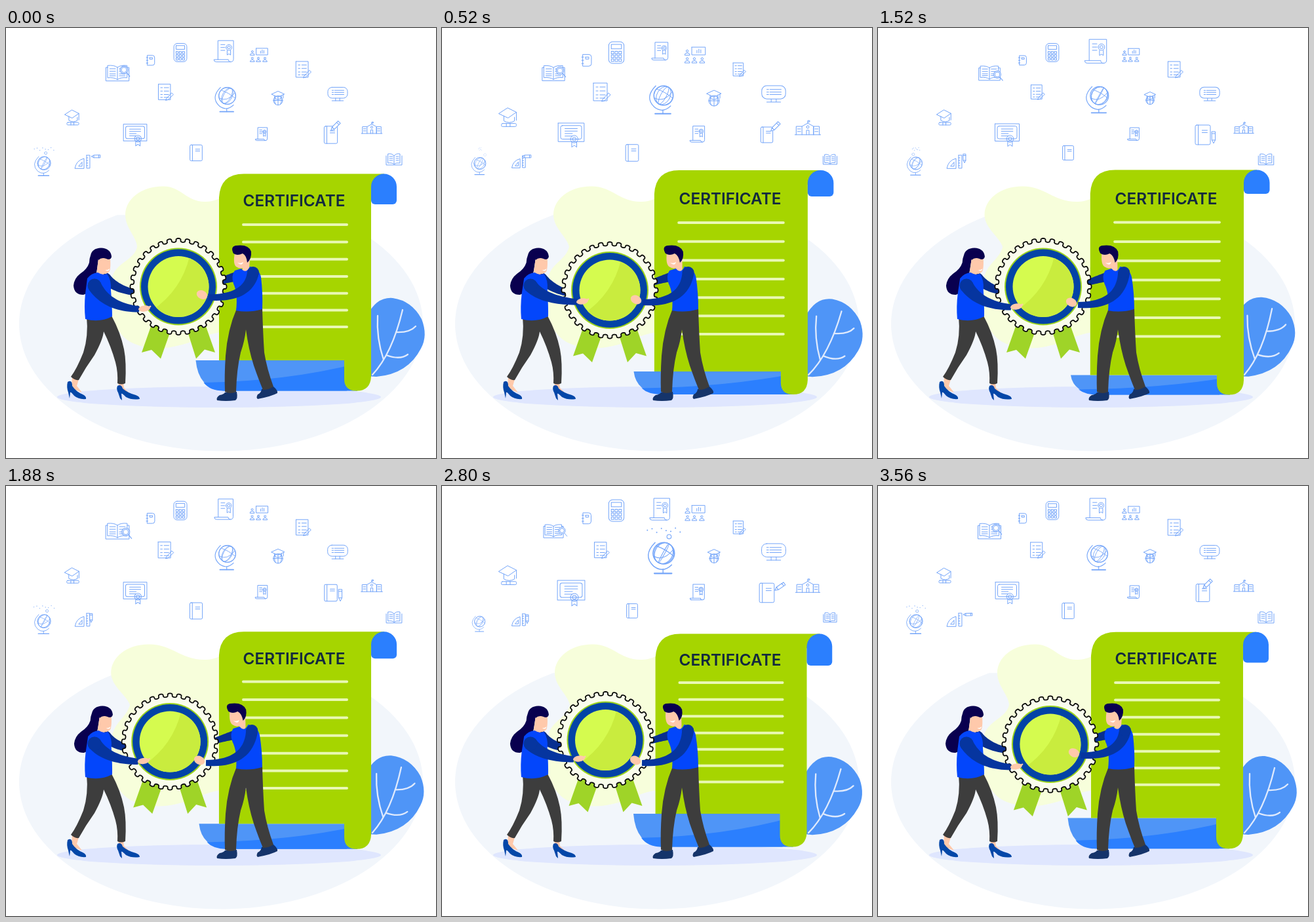
Write an HTML page with a canvas that moves like this. It is 656 px wide and 656 px high and loops after 3600 ms.

```html
<!DOCTYPE html>
<html lang="en">
<head>
<meta charset="utf-8">
<title>Certificate</title>
<style>
html, body { margin: 0; width: 100%; height: 100%; overflow: hidden; background: #fff; }
canvas { display: block; width: 656px; height: 656px; }
</style>
</head>
<body>
<canvas id="stage" width="656" height="656"></canvas>
<script>
const ctx = document.getElementById('stage').getContext('2d');
const LOOP = 3600, STEP = 40, PULSE = 1800, TAU = Math.PI * 2;
const TIMES = [0, 520, 1040, 1520, 2240, 2800];
const SKIN = '#ffc9ab', HAIR = '#09004f', SHIRT = '#0346fb', SLEEVE = '#06359f';
const TROUSERS = '#3d3d3d', GREEN = '#a6d500', BLUE = '#2b7ffe', LIGHT_BLUE = '#4f95f7';
const INK = '#74a5f9';

// Periodic monotone cubic through the given poses.
function track(t, values, times = TIMES) {
  const n = values.length;
  const time = i => times[(i + n) % n] + Math.floor(i / n) * LOOP;
  const value = i => values[(i + n) % n];
  const slope = i => (value(i + 1) - value(i)) / (time(i + 1) - time(i));
  const tangent = i => {
    const a = slope(i - 1), b = slope(i);
    return a * b <= 0 ? 0 : 2 * a * b / (a + b);
  };
  let i = n - 1;
  while (times[i] > t) i--;
  const span = time(i + 1) - time(i), u = (t - time(i)) / span, v = 1 - u;
  return value(i) * v * v * (1 + 2 * u) + value(i + 1) * u * u * (3 - 2 * u)
    + span * u * v * (v * tangent(i) - u * tangent(i + 1));
}

const wave = (t, peak) => Math.cos(TAU * (t - peak) / PULSE);
const pulse = (t, min, max, peak) => (min + max + (max - min) * wave(t, peak)) / 2;

function fill(path, color) {
  ctx.fillStyle = color;
  ctx.fill(path instanceof Path2D ? path : new Path2D(path));
}

function stroke(path, color, width) {
  ctx.strokeStyle = color;
  ctx.lineWidth = width;
  ctx.stroke(path instanceof Path2D ? path : new Path2D(path));
}

function oval(x, y, rx, ry, color, angle = 0) {
  ctx.fillStyle = color;
  ctx.beginPath();
  ctx.ellipse(x, y, rx, ry, angle, 0, TAU);
  ctx.fill();
}

function at(x, y, draw, scale = 1, angle = 0) {
  ctx.save();
  ctx.translate(x, y);
  ctx.rotate(angle);
  ctx.scale(scale, scale);
  draw();
  ctx.restore();
}

// Tapered limb along a quadratic curve.
function limb(x0, y0, cx, cy, x1, y1, w0, w1, color) {
  const upper = [], lower = [], steps = 20;
  for (let i = 0; i <= steps; i++) {
    const u = i / steps, v = 1 - u;
    const x = v * v * x0 + 2 * u * v * cx + u * u * x1;
    const y = v * v * y0 + 2 * u * v * cy + u * u * y1;
    const a = Math.atan2(v * (cy - y0) + u * (y1 - cy), v * (cx - x0) + u * (x1 - cx));
    const w = (w0 + (w1 - w0) * u) / 2;
    upper.push([x - w * Math.sin(a), y + w * Math.cos(a)]);
    lower.unshift([x + w * Math.sin(a), y - w * Math.cos(a)]);
  }
  ctx.fillStyle = color;
  ctx.beginPath();
  for (const p of upper.concat(lower)) ctx.lineTo(...p);
  ctx.fill();
  oval(x0, y0, w0 / 2, w0 / 2, color);
}

// Path pieces for the line icons.
const ring = (x, y, r) => `M${x - r} ${y}a${r} ${r} 0 1 1 ${2 * r} 0a${r} ${r} 0 1 1 ${-2 * r} 0`;
const box = (x, y, w, h, r = 0) => `M${x + r} ${y}h${w - 2 * r}a${r} ${r} 0 0 1 ${r} ${r}v${h - 2 * r}`
  + `a${r} ${r} 0 0 1 ${-r} ${r}h${2 * r - w}a${r} ${r} 0 0 1 ${-r} ${-r}v${2 * r - h}a${r} ${r} 0 0 1 ${r} ${-r}z`;
const rows = (x, w, ...ys) => ys.map(y => `M${x} ${y}h${w}`).join('');
const person = (x, y) => ring(x, y - 3, 1.7) + `M${x - 4} ${y + 3}q0-3 4-3q4 0 4 3z`;
const keypad = [-2, 4, 10].map(y => [-8, -2, 4].map(x => box(x, y, 4, 4)).join('')).join('');

const CALCULATOR = box(-12, -17, 24, 34, 6) + box(-8, -13, 16, 7) + keypad;
const NOTEBOOK = 'M-5-9H4q4 0 4 4V5q0 4-4 4H-5z' + box(-1, -5, 5, 3) + rows(-7, 3, -5, 0, 5);
const DEED = 'M-11 15V-18H16V14q0 5-5 5H-14q-4 0-4-4H7q0 4 4 4' + ring(8, -6, 5) + ring(8, -6, 2.5)
  + 'M5-1v8l3-2l3 2v-8' + rows(-6, 7, -11, -6, -1);
const CLASSROOM = person(-11, -3) + person(-11, 9) + person(0, 9) + person(12, 9)
  + box(-4, -12, 21, 12) + 'M4-3v-4M7-3v-6M10-3v-5';
const CHECKLIST = box(-12, -14, 21, 27) + rows(-2, 8, -8, -2, 4, 9) + rows(-8, 3, -8, -2, 4, 9)
  + 'M2 11l9-10l3 3l-9 9l-4 1z';
const SCHOLAR = 'M-11-7l11-5l11 5l-11 5zM-6-4v4q6 4 12 0v-4M9-6v6' + ring(0, 4, 8)
  + 'M-8 4h16M0-3v15M-4-3q-4 7 0 14M4-3q4 7 0 14';
const MONITOR = box(-19, -14, 38, 21, 8) + rows(-11, 3, -8, -4, 0) + rows(-6, 18, -8, -4, 0)
  + 'M-4 7v5M4 7v5M-11 12h22';
const MORTARBOARD = 'M-16-8l14-9l14 7l-13 9zM-8-4v8q9 5 17 0v-6M12-10v13'
  + box(-12, 8, 24, 5, 2) + 'M-4 8v5M2 8v5';
const DIPLOMA = box(-21, -18, 42, 30) + box(-17, -14, 34, 22, 3) + rows(-10, 20, -9, -5)
  + rows(-10, 12, -1, 3) + ring(5, 8, 6) + ring(5, 8, 3) + 'M1 13v8l4-3l4 3v-8';
const BOOK = box(-10, -13, 20, 26, 2) + 'M-6-13v26' + rows(-1, 7, -6, -3);
const SCHOOL = 'M-20 10h40M-18 10v-13h9v13M9 10v-13h9v13M-9-3l9-5l9 5v13M-2 10v-7h4v7M0-8v-4h3v2h-3'
  + rows(-16, 5, 1, 5) + rows(11, 5, 1, 5) + ring(0, -2, 2);
const OPEN_BOOK = 'M0-6v13M-12-6v14h24v-14M-9-9q6-1 9 3q3-4 9-3v14q-6-1-9 2q-3-3-9-2z'
  + rows(-7, 5, -5, -2, 1) + rows(3, 4, -5, -2, 1);
const MAGAZINE = 'M-15-12q10-1 15 3q5-4 15-3v19q-10-1-15 3q-5-4-15-3zM0-9v19M-15-9h-3v21h36v-21h-3'
  + rows(-12, 9, -7, -3, 1, 4) + rows(3, 9, -7, -3, 1, 4);
const DRAWING_SET = 'M-15 10q2-12 14-15v15zM-9 7h5v-6z' + box(3, -10, 5, 20) + rows(3, 2, -6, -2, 2, 6);
const PENCIL = 'M-2.5-9h5V4l-2.5 5l-2.5-5zM-2.5-6h5M-2.5 4h5';

// x, y, smallest scale, largest scale, time of largest, path
const ICONS = [
  [266, 37.5, .81, 1, 760, CALCULATOR],
  [170, 69, .83, 1, 200, MAGAZINE],
  [220, 49.3, .8, 1, 640, NOTEBOOK],
  [333, 35, .73, 1, 1380, DEED],
  [390, 161.5, .52, .68, 720, DEED],
  [385, 41, .81, 1, 680, CLASSROOM],
  [243, 98, .79, 1, 500, CHECKLIST],
  [453, 63.5, .7, .9, 1680, CHECKLIST],
  [415, 107, .78, 1, 480, SCHOLAR],
  [506, 101.5, .78, 1, 780, MONITOR],
  [102, 138, .75, 1, 780, MORTARBOARD],
  [197, 162, .85, 1, 900, DIPLOMA],
  [495.5, 163, .9, 1.2, 1280, BOOK],
  [290, 190.5, .8, 1, 350, BOOK],
  [558, 153, .76, 1, 680, SCHOOL],
  [592, 201, .83, 1, 1750, OPEN_BOOK],
  [120, 204, .88, 1, 1650, DRAWING_SET]
].map(([x, y, min, max, peak, path]) => ({ x, y, min, max, peak, path: new Path2D(path) }));

function pencil(x, y, degrees, scale) {
  at(x, y, () => { fill(PENCIL, '#fff'); stroke(PENCIL, INK, 1 / scale); }, scale, degrees * Math.PI / 180);
}

function globe(t, x, y, min, max, peak) {
  const phase = (t - peak + 1.5 * PULSE) % PULSE / PULSE;
  at(x, y, () => {
    stroke(ring(3, -4, 15) + 'M-9-19q-18 18-2 33q13 10 25-2M2 18v6', INK, 1.3);
    stroke('M-10 24h24', INK, 2);
    ctx.lineWidth = 1;
    for (let i = 0; i < 3; i++) {
      ctx.beginPath();
      ctx.ellipse(3, -4, 15 * Math.abs(Math.cos(TAU * phase / 2 + i * 1.05)), 15, .5, 0, TAU);
      ctx.stroke();
    }
    stroke('M-11 0Q3 8 17-10M-7-14Q5-10 17 0', INK, 1);
  }, pulse(t, min, max, peak));
  const shown = Math.max(0, Math.cos(TAU * (phase - .52)) * .9 + .1);
  if (shown < .05) return;
  at(x, y, () => {
    ctx.globalAlpha = Math.min(1, shown * 2);
    for (let i = 0; i < 8; i++) {
      oval(3 + (i - 3.5) * 6.5 * shown, -36 - 3 * Math.sin(i * 2.4), .9, .9, INK);
    }
    stroke(ring(-13 + 27 * Math.min(1, Math.max(0, phase * 2.4 - .4)), -22 - 5 * shown, 3), INK, 1);
  }, max);
  ctx.globalAlpha = 1;
}

function drawIcons(t) {
  for (const { x, y, min, max, peak, path } of ICONS) {
    const scale = pulse(t, min, max, peak);
    at(x, y, () => stroke(path, INK, 1 / scale), scale);
  }
  at(track(t, [180, 180, 178, 182, 183, 183]), track(t, [64, 65, 68, 71, 69, 68]), () => {
    fill(ring(0, 0, 6), '#fff');
    stroke(ring(0, 0, 6) + ring(0, 0, 4) + 'M4 4l5 6', INK, 1.1);
  }, pulse(t, .85, 1, 200));
  globe(t, 335, 107, .86, 1.1, 950);
  globe(t, 56, 209, .54, .68, 50);
  pencil(track(t, [502, 508, 515, 512, 509, 515]), track(t, [150, 151, 154, 167, 166, 154]),
    track(t, [45, 45, 60, 0, 0, 55]), 1);
  pencil(track(t, [137, 129, 138, 132, 129, 130]), track(t, [196, 196, 197.5, 199, 203, 203]),
    track(t, [90, 90, 90, 0, 0, 0]), .75);
}

function drawBackdrop(t) {
  // The oval is flattened at the top.
  const cut = 1.03;
  ctx.fillStyle = '#f2f6fb';
  ctx.beginPath();
  ctx.ellipse(328, 451.5, 308, 194, 0, -cut, Math.PI + cut);
  ctx.fill();
  const d = track(t, [0, -12, -15.5, -19.5, -23, -10]);
  fill(`M${182 + d} 285C${182 + d} 262 ${205 + d} 241.5 ${240 + d} 241.5C${268 + d * .6} 241.5 ${275 + d * .4} 266 305 265
    C316 265 325 260 340 255L400 300V440C360 470 330 455 290 476C250 492 215 492 190 479
    C160 462 150 415 162 380C168 358 ${196 + d * .6} 354 ${200 + d * .5} 334C${200 + d * .7} 320 ${182 + d} 305 ${182 + d} 285Z`, '#f7fedb');
  oval(325, 563, 247, 16, '#dfe6fe');
}

function drawLeaf(t) {
  const sway = track(t, [0, 2.6, 3.4, 1, -2.2, .5, 2], [0, 520, 700, 1040, 1520, 2240, 2800]);
  at(557, 531, () => {
    fill('M-6 0Q-16-50-6-92Q8-121 33-119Q62-115 77-87Q87-62 76-42Q56-3 8 1Z', LIGHT_BLUE);
    stroke('M2-2Q32-34 48-101M19-25Q8-58 10-92M38-67Q59-66 68-76M23-32Q44-24 56-33', '#dfeafd', 2.3);
  }, 1, sway * Math.PI / 180);
}

function drawScroll(t) {
  const top = track(t, [222.5, 217, 214, 216.5, 226.5, 225.5]);
  const drop = top - 222.5, bottom = 776 - top;
  const left = 325 + drop * .2, right = 557 - drop * .16, end = 596 - drop * .25, fold = right - 41;
  const rollEnd = track(t, [269, 257, 250, 253, 272.5, 274]);
  const curl = track(t, [507, 524, 533, 529.5, 502, 500]), depth = bottom - curl;
  const curlLeft = track(t, [289.5, 292.5, 294, 294, 295, 292]);

  fill(`M${curlLeft} ${curl}H${fold + 4}V${bottom}H${curlLeft + 42}Q${curlLeft + 4} ${bottom - 3} ${curlLeft} ${curl}Z`, LIGHT_BLUE);
  fill(`M${curlLeft + 12} ${curl + depth * .73}Q${curlLeft + 140} ${curl + depth * .68} ${fold + 20} ${curl + depth * .1}V${bottom}
    H${curlLeft + 42}Q${curlLeft + 22} ${bottom} ${curlLeft + 12} ${curl + depth * .73}Z`, BLUE);
  fill(`M${left} ${curl}V${top + 36}Q${left + 2} ${top} ${left + 38} ${top}H${right + 20}V${top + 22}H${right}
    V${bottom - 22}Q${right - 1} ${bottom} ${right - 22} ${bottom}Q${fold} ${bottom} ${fold} ${bottom - 18}V${curl}Z`, GREEN);
  ctx.fillStyle = BLUE;
  ctx.beginPath();
  ctx.roundRect(right, top, end - right, rollEnd - top, [19.5, 19.5, 6, 6]);
  ctx.fill();

  ctx.fillStyle = '#12293f';
  ctx.font = '600 24.3px Inter, sans-serif';
  ctx.textAlign = 'center';
  ctx.fillText('CERTIFICATE', 439.5, 272.3 + drop * .55);

  const first = track(t, [300, 297, 295.5, 296.5, 300, 300]);
  const last = track(t, [456, 467, 473, 470.5, 452.5, 451.5]);
  const half = 79 - drop * .15;
  for (let i = 0; i < 7; i++) {
    const y = first + (last - first) * i / 6 + Math.sin(Math.PI * i / 6);
    stroke(`M${441 - half} ${y}H${441 + half}`, '#e9f8b4', 4);
  }
}

const TEETH = 32;
const scallops = new Path2D();
for (let i = 0; i <= 720; i++) {
  const a = i / 720 * TAU, r = 70.8 + 2.8 * Math.cos(TEETH * a), b = a + .016 * Math.sin(2 * TEETH * a);
  scallops.lineTo(r * Math.sin(b), -r * Math.cos(b));
}

function drawBadge(x, y) {
  at(x, y, () => {
    fill('M-41 58L-56 100.5L-41 96.5L-27 110L-10 62ZM41 58L56 100.5L40 96L27 110L12 62Z', '#9fd428');
    fill(scallops, '#fafdec');
    stroke(scallops, '#0a0a0a', 1.8);
    oval(0, 0, 59, 59, '#9bd31d');
    oval(0, 0, 57, 57, '#0343a6');
    oval(0, 0, 46.5, 46.5, '#d5fb4f');
    ctx.save();
    ctx.clip(new Path2D(ring(0, 0, 46.5)));
    fill('M18-50Q6 5-40 36L0 60L60 50V-50Z', '#c9ec3e');
    ctx.restore();
  });
}

// Upper bodies lean by shearing above the hips.
function lean(amount, hip, draw) {
  ctx.save();
  ctx.transform(1, 0, -amount, 1, amount * hip, 0);
  draw();
  ctx.restore();
}

function drawWoman(t) {
  const handX = track(t, [211, 214, 214, 211, 209, 209]);
  const handY = track(t, [428, 417, 428, 425, 415.5, 416]);
  fill('M101 531L111 536L108 546L116 556L100 550ZM171 541L179 541L180 549L190 559L174 554Z', SKIN);
  fill('M94 540Q101 536 101 546Q107 555 117 559Q123 562 122 566Q111 567 104 561Q99 555 98 556L97 565L95 556Q92 548 94 540Z', '#0447a8');
  fill('M170 546Q176 543 178 550Q186 557 198 560Q204 562 204 566Q192 568 183 563Q177 557 176 558L177 568L174 565L171 556Q168 551 170 546Z', '#0447a8');
  fill('M123 440Q126 470 118 495Q108 520 99 532Q105 538 111 537Q122 517 135 499Q148 475 149 463Q160 485 167 510Q171 525 170 542Q176 545 182 542Q184 510 180 490Q175 465 161 439Z', TROUSERS);
  lean(track(t, [0, .02, .025, .02, .02, .02]), 440, () => {
    fill('M129 347Q131 336 145 335.5Q159 336 161 348Q160 355 153 352Q146 349 141 352Q139 370 137 378Q128 388 125 398Q124 406 118 407Q104 407 103 393Q104 382 113 375Q124 368 127 358Q127 352 129 347Z', HAIR);
    fill('M141 352Q150 347 159 352Q160 365 158 371Q154 376 149 375L150 380Q142 382 138 376Z', SKIN);
    fill('M138 346Q150 338 161 349Q159 355 153 352Q146 349 141 354Z', HAIR);
    fill('M151 369Q155 370 158 367Q157 373 151 369Z', '#fff');
    fill('M124 382Q130 374 140 373Q148 378 154 375Q161 384 160 400Q162 425 162 440Q143 450 121 444Q119 425 121 405Z', SHIRT);
  });
  limb(135, 393, 154, handY - 2, handX - 8, handY + 1, 21, 9, SLEEVE);
  oval(handX, handY, 9, 4.5, SKIN, -.15);
  limb(handX + 2, handY, handX + 7, handY - 1, handX + 10, handY - 4, 4, 2, SKIN);
}

function drawMan(t) {
  const bend = track(t, [0, -.07, -.088, -.088, -.088, -.088]);
  const handX = track(t, [299, 296, 295, 295, 295, 295]);
  const handY = track(t, [407, 414.5, 418.5, 418.5, 418.5, 418.5]);
  fill('M334 556L352 555Q354 566 350 568Q335 570 322 568Q320 564 326 560Q332 559 334 556Z', '#15346a');
  fill('M390 551L408 547Q415 553 414 557Q405 562 384 566Q381 564 384 559Q389 557 390 551Z', '#15346a');
  fill('M352 428Q338 460 335 500Q333 530 334 555Q343 559 351 555Q352 520 358 495Q364 478 366 460Q370 490 378 515Q386 538 392 552Q401 552 408 547Q398 520 394 495Q392 465 391 428Z', TROUSERS);
  lean(bend, 430, () => {
    fill('M349 343Q346 360 351 364Q357 368 361 366L360 373Q367 376 371 368L372 352Q371 343 360 342Z', SKIN);
    fill('M347 344Q342 334 350 332Q370 329 374 341Q375 352 368 358Q367 347 361 344Q353 348 347 344Z', HAIR);
    fill('M353 358Q358 360 362 357Q360 364 353 358Z', '#fff');
  });
  lean(bend * .45, 430, () => {
    fill('M349 370L359 367Q366 376 372 364Q386 366 389 380Q392 405 391 429Q370 435 351 431Q354 405 347 390Q343 378 349 370Z', SHIRT);
  });
  limb(377 + bend * 20, 373, 370, handY + 6, handX + 10, handY + 4, 18, 9, SLEEVE);
  oval(handX, handY, 8.5, 6.5, SKIN, .45);
}

function draw(t) {
  ctx.clearRect(0, 0, 656, 656);
  ctx.lineCap = ctx.lineJoin = 'round';
  const badgeX = track(t, [263, 256, 253.5, 252, 249, 249.5]);
  const badgeY = track(t, [394.5, 400, 402, 394.5, 387.5, 387.5]);
  drawBackdrop(t);
  drawIcons(t);
  drawLeaf(t);
  drawScroll(t);
  limb(152, 382, 168, 399, 200, 404 + (badgeY - 394.5) * .5, 17, 9, '#082f90');
  limb(352, 379, 340, 382, 318, 389, 15, 9, '#082f90');
  drawBadge(badgeX, badgeY);
  drawWoman(t);
  drawMan(t);
}

function tick() {
  draw(Math.floor(performance.now() / STEP) * STEP % LOOP);
  requestAnimationFrame(tick);
}
tick();
</script>
</body>
</html>
```
